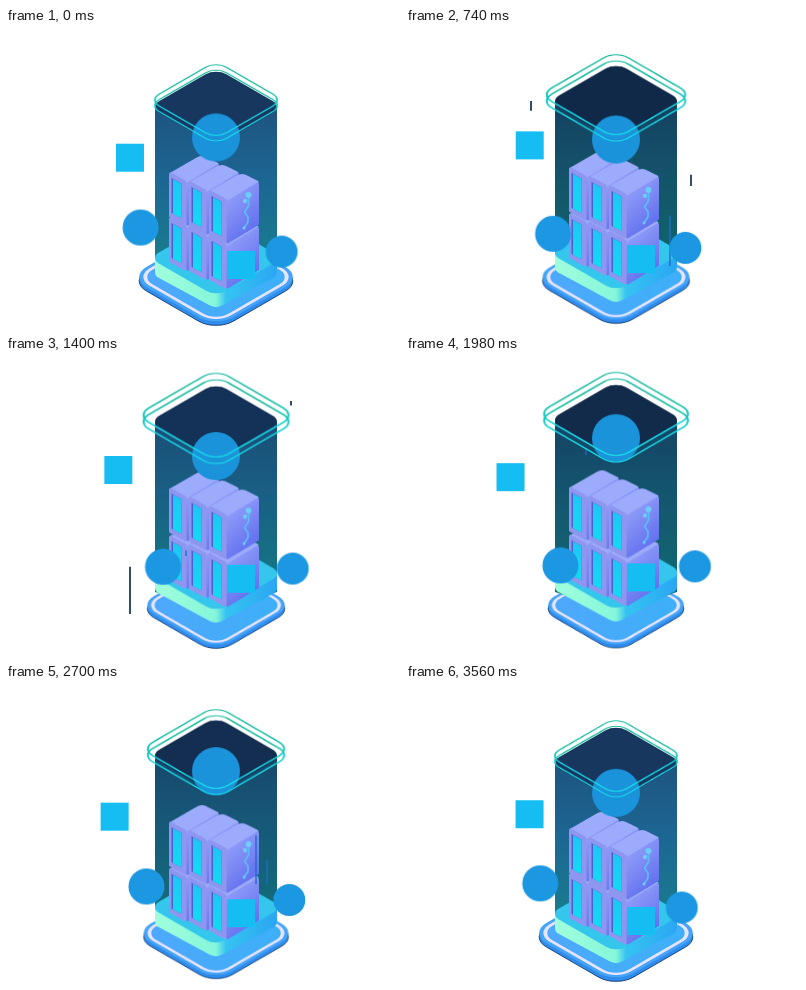
Write an HTML page that moves like this. It is 394 px wide and 300 px high and loops after 3.58 s.

```html
<!DOCTYPE html>
<html lang="en">
<head>
<meta charset="utf-8">
<title>Isometric server tower</title>
<style>
  html, body { margin: 0; width: 100%; height: 100%; overflow: hidden; background: #fff; }
  svg { display: block; width: 100vw; height: 100vh; }

  /* Half a loop each way, close to a cosine */
  .sway {
    --from: translate(0, 0);
    animation: sway 1790ms cubic-bezier(.364, 0, .636, 1) infinite alternate;
    animation-delay: var(--delay, 0ms);
  }
  @keyframes sway { from { transform: var(--from); } to { transform: var(--to); } }

  .base  { --from: scale(1); --to: scale(.88); transform-origin: 210px 250px; }
  .pad   { --to: translate(0, -14px); }
  .glass { --to: translate(0, -15px); }
  .low   { --to: translate(0, -11px); }
  .high  { --to: translate(0, -14px); }
  .rings { --to: translate(0, -14.5px); }
  .coin  { --to: translate(0, -16px); }
  .coin-x { --from: translate(-11px, 0); --to: translate(11px, 0); --delay: -1422ms; }
  .coin-y { --from: translate(0, 10.4px); --to: translate(0, -10.4px); --delay: -547ms; }
  .disc-l { --from: translate(-12px, -6px); --to: translate(12px, 6px); --delay: -229ms; }
  .disc-r { --from: translate(-6.7px, 6.7px); --to: translate(6.7px, -6.7px); --delay: -3481ms; }

  .widen { transform-origin: 210px 72px; animation: widen 3580ms infinite; }
  @keyframes widen {
    0%   { transform: scale(1); animation-timing-function: cubic-bezier(.39, .575, .565, 1); }
    43%  { transform: scale(1.19); animation-timing-function: cubic-bezier(.47, 0, .745, .715); }
    100% { transform: scale(1); }
  }

  .float { animation: float 3580ms cubic-bezier(.364, 0, .636, 1) -1400ms infinite; }
  @keyframes float {
    0%, 100% { transform: translate(0, -15.5px); }
    47.5%, 62.8% { transform: translate(0, 15.5px); }
  }

  .dim { animation: dim 596.667ms cubic-bezier(.364, 0, .636, 1) infinite alternate; }
  @keyframes dim { from { opacity: 0; } to { opacity: 1; } }

  .beams path {
    fill: none; stroke: #1d6fc4; stroke-width: 1.4;
    animation: beam 3580ms linear var(--at) infinite;
  }
  .beams .out { stroke: #173a63; stroke-width: 1.8; }
  @keyframes beam {
    0%    { stroke-dasharray: 0 200; stroke-dashoffset: 0; }
    5.8%  { stroke-dasharray: 50 200; stroke-dashoffset: 0; }
    11.6% { stroke-dasharray: 50 200; stroke-dashoffset: -50; }
    17.4% { stroke-dasharray: 0 200; stroke-dashoffset: -100; opacity: 1; }
    17.5%, 100% { stroke-dasharray: 0 200; stroke-dashoffset: -100; opacity: 0; }
  }
</style>
</head>
<body>
<svg viewBox="0 0 394 300" preserveAspectRatio="none">
  <defs>
    <linearGradient id="bright" gradientUnits="userSpaceOnUse" x1="0" y1="80" x2="0" y2="250">
      <stop offset="0" stop-color="#1e5480"/><stop offset=".4" stop-color="#1d6592"/><stop offset="1" stop-color="#17828f"/>
    </linearGradient>
    <linearGradient id="dark" gradientUnits="userSpaceOnUse" x1="0" y1="80" x2="0" y2="250">
      <stop offset="0" stop-color="#143f5c"/><stop offset=".4" stop-color="#135064"/><stop offset="1" stop-color="#0f646a"/>
    </linearGradient>
    <linearGradient id="rim" x1="0" y1="0" x2="1" y2="1">
      <stop offset=".35" stop-color="#10b99c"/><stop offset=".65" stop-color="#18d8e8"/>
    </linearGradient>
    <linearGradient id="deck" x1="0" y1="1" x2="1" y2="0">
      <stop offset="0" stop-color="#50a8fc"/><stop offset="1" stop-color="#3cb0f8"/>
    </linearGradient>
    <linearGradient id="step">
      <stop offset="0" stop-color="#a0ffdc"/><stop offset=".5" stop-color="#86f6da"/>
      <stop offset=".58" stop-color="#36c4f2"/><stop offset="1" stop-color="#2aa6f2"/>
    </linearGradient>
    <linearGradient id="side" x1="0" y1="0" x2=".5" y2="1">
      <stop offset="0" stop-color="#99a8fc"/><stop offset=".55" stop-color="#7c88f4"/><stop offset="1" stop-color="#6070ee"/>
    </linearGradient>
    <linearGradient id="slot" x1="0" y1="0" x2="0" y2="1">
      <stop offset="0" stop-color="#20c4f4"/><stop offset="1" stop-color="#12dcf2"/>
    </linearGradient>

    <clipPath id="tube"><path d="M140 0H280V236H271L210 256L149 236H140Z"/></clipPath>
    <rect id="cap" x="-38.7" y="-38.7" width="77.4" height="77.4" rx="12" transform="matrix(.866 .5 -.866 .5 210 79)"/>
    <path id="wall" d="M149 79V270H271V79L260 88L217 112Q210 116 203 112L160 88Z"/>
    <rect id="slab" x="-50.2" y="-50.2" width="100.4" height="100.4" rx="20"/>
    <rect id="ring" x="-38.7" y="-38.7" width="77.4" height="77.4" rx="12"/>

    <g id="box" stroke-linejoin="round" stroke-width="3">
      <path d="M2 1L28 -14Q33 -17 38 -14L48 -9L18 9Z" fill="#9cabfc" stroke="#9cabfc"/>
      <path d="M18.500 11L48.500 -7V33L18.500 51Z" fill="url(#side)" stroke="url(#side)"/>
      <path d="M1.500 1L16 9V51L1.500 43Z" fill="#8f96f0" stroke="#8f96f0"/>
      <path d="M2.500 5L12.500 10.500V45L2.500 40Z" fill="#4a60cf"/>
      <path d="M4 6L12.500 10.700V45L4 40.700Z" fill="url(#slot)"/>
    </g>
    <g id="row">
      <use href="#box" x="163" y="145"/>
      <use href="#box" x="183" y="154"/>
      <use href="#box" x="203" y="163"/>
    </g>
  </defs>

  <g class="sway base">
    <use href="#slab" transform="matrix(.866 .5 -.866 .5 210 253)" fill="#2f8bec" stroke="#123c70" stroke-width=".8"/>
    <use href="#slab" transform="matrix(.866 .5 -.866 .5 210 249)" fill="#46a4f8"/>
    <rect x="-45.500" y="-45.500" width="91" height="91" rx="16" transform="matrix(.866 .5 -.866 .5 210 249)"
          fill="url(#deck)" stroke="#e6e4ff" stroke-width="3.2"/>
  </g>

  <g clip-path="url(#tube)">
    <g class="sway glass">
      <use href="#wall" fill="url(#bright)"/>
      <use href="#cap" fill="#17375f"/>
      <g class="dim">
        <use href="#wall" fill="url(#dark)"/>
        <use href="#cap" fill="#112845"/>
      </g>
    </g>
  </g>

  <g class="sway pad">
    <path d="M149 231V244Q149 248 153 250L203 277Q210 281 217 277L267 250Q271 248 271 244V231Z" fill="url(#step)"/>
    <rect x="-38.500" y="-38.500" width="77" height="77" rx="11" transform="matrix(.866 .5 -.866 .5 210 230)" fill="#35c6ee"/>
  </g>

  <g class="sway low"><use href="#row" y="45"/></g>
  <g class="sway high">
    <use href="#row"/>
    <path d="M242.500 167V178L238.500 184L242 189V194L238 200" fill="none" stroke="#5cbcf8" stroke-width="1.700"/>
    <g fill="#6cccfa">
      <circle cx="242.500" cy="167" r="3"/><circle cx="239" cy="173" r="2.200"/><circle cx="238" cy="200" r="1.500"/>
    </g>
  </g>

  <g class="beams">
    <path class="out" pathLength="100" style="--at:-3440ms" d="M125 260V73"/>
    <path class="out" pathLength="100" style="--at:-2285ms" d="M124 258V73"/>
    <path class="out" pathLength="100" style="--at:-2880ms" d="M285 158V45"/>
    <path class="out" pathLength="100" style="--at:-2785ms" d="M285 158V45"/>
    <path pathLength="100" style="--at:-3080ms" d="M264 246V145"/>
    <path pathLength="100" style="--at:-2200ms" d="M180 200V93"/>
    <path pathLength="100" style="--at:-860ms" d="M229 190V90"/>
    <path pathLength="100" style="--at:-1080ms" d="M250 200V100"/>
    <path pathLength="100" style="--at:-980ms" d="M261 200V100"/>
  </g>

  <circle class="float" cx="210" cy="96" r="24" fill="#1b93da"/>

  <g class="sway rings"><g class="widen" fill="none" stroke="url(#rim)" stroke-width="1.400">
    <use href="#ring" transform="matrix(.866 .5 -.866 .5 210 72)"/>
    <use href="#ring" transform="matrix(.866 .5 -.866 .5 210 77.500)"/>
  </g></g>

  <g class="sway coin-x"><g class="sway coin-y">
    <rect x="101" y="110" width="28" height="28" fill="#16bdf2"/>
  </g></g>
  <rect class="sway coin" x="221" y="223" width="28" height="28" fill="#16bdf2"/>
  <circle class="sway disc-l" cx="145.500" cy="205" r="18" fill="#1c97e2"/>
  <circle class="sway disc-r" cx="282.300" cy="217" r="16" fill="#1c97e2"/>
</svg>
</body>
</html>
```
